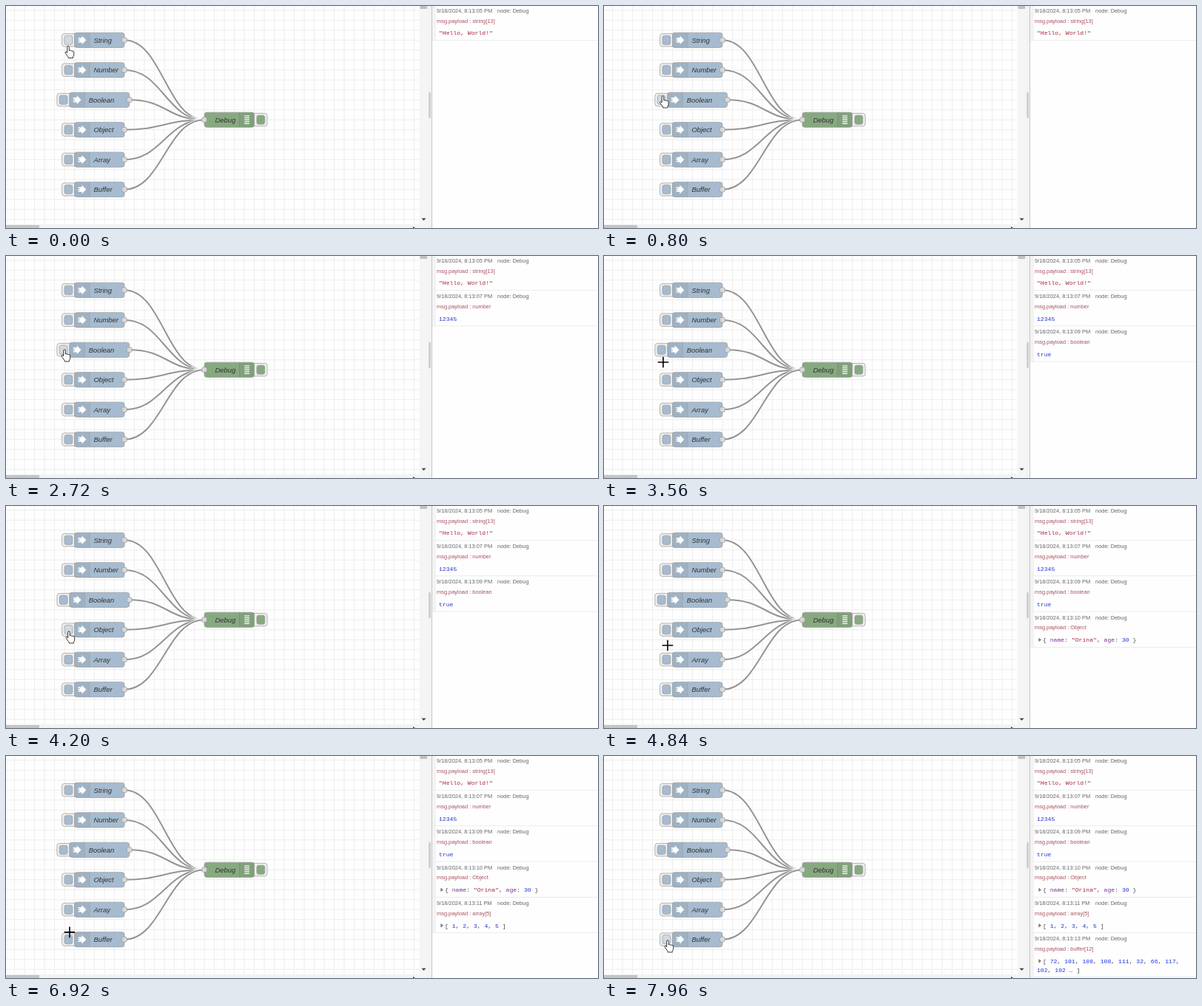
Recreate the animation shown at these times as an HTML page. Size 800 by 301 pixels, loop 8000 ms.

```html
<!DOCTYPE html>
<html lang="en">
<head>
<meta charset="utf-8">
<title>Flow editor with debug sidebar</title>
<style>
  html, body { margin: 0; width: 100%; height: 100%; overflow: hidden; background: #fefefe; }
  svg { display: block; width: 800px; height: 301px; }
  text { white-space: pre; }
  .label { font: italic 9.45px "Liberation Sans", Arial, sans-serif; fill: #333; }
  .meta { font: 7.43px "Liberation Sans", Arial, sans-serif; fill: #666; }
  .topic { fill: #a9525f; }
  .value { font: 8.1px "Liberation Mono", monospace; fill: #444; }
  .num { fill: #2033d6; }
  .str { fill: #a8243c; }
  .key { fill: #792e90; }
  .edge { stroke: #999; stroke-width: .7; }
</style>
</head>
<body>
<svg id="stage" viewBox="0 0 800 301"></svg>
<script>
const LOOP = 8000, UNIT = 0.675;
const BLUE = '#a6bbcf', GREEN = '#87a980';
const DEBUG = { x: 268, y: 154.25, w: 67.5 };

const injects = ['String', 'Number', 'Boolean', 'Object', 'Array', 'Buffer'].map((name, i) => {
  const w = (name === 'Boolean' ? 120 : 100) * UNIT;
  return { name, w, x: 126.25 - w / 2, y: 46.25 + i * 40.5 };
});

const num = s => `<tspan class="num">${s}</tspan>`;
const str = s => `<tspan class="str">${s}</tspan>`;
const key = s => `<tspan class="key">${s}</tspan>`;
const nums = list => list.map(num).join(', ');

const messages = [
  { at: 0, sec: '05', type: 'string[13]', lines: [str('"Hello, World!"')] },
  { at: 1440, sec: '07', type: 'number', lines: [num(12345)] },
  { at: 3240, sec: '09', type: 'boolean', lines: [num('true')] },
  { at: 4600, sec: '10', type: 'Object', folded: true,
    lines: [`{ ${key('name')}: ${str('"Orina"')}, ${key('age')}: ${num(30)} }`] },
  { at: 5960, sec: '11', type: 'array[5]', folded: true, lines: [`[ ${nums([1, 2, 3, 4, 5])} ]`] },
  { at: 7440, sec: '13', type: 'buffer[12]', folded: true,
    lines: [`[ ${nums([72, 101, 108, 108, 111, 32, 66, 117])},`, `${nums([102, 102])} … ]`] }
];

// Pointer hotspot: time, x, y
const pointerPath = [
  [0, 84, 54.5], [180, 84, 54.5], [740, 79.5, 122], [880, 79.5, 122],
  [1250, 82.5, 88], [1920, 82.5, 88], [2450, 79, 127], [3300, 79, 127],
  [3560, 80, 144], [4100, 85, 170], [4650, 85, 170], [4840, 86, 189],
  [5400, 87, 209], [6400, 87, 209], [6720, 86, 232], [7200, 86, 250], [LOOP, 86, 250]
];

const rect = (x, y, w, h, fill, extra = '') =>
  `<rect x="${x}" y="${y}" width="${w}" height="${h}" fill="${fill}" ${extra}/>`;
const box = (x, y, w, h, fill, r, extra = '') => rect(x, y, w, h, fill, `class="edge" rx="${r}" ${extra}`);
const text = (x, y, cls, content) => `<text x="${x}" y="${y}" class="${cls}">${content}</text>`;
const port = (x, y) => box(x - 3.4, y - 3.4, 6.75, 6.75, '#d9d9d9', 2);
const button = (x, innerX, y, fill, extra) =>
  box(x, y - 8.8, 21.6, 17.5, '#eee', 3.4) + box(innerX, y - 6.1, 10.8, 12.2, fill, 2.7, extra);

function iconPanel(x, y, lineX) {
  return rect(x, y - 9.8, 20.2, 19.6, '#000', 'opacity=".05"') +
    rect(lineX, y - 10, .7, 20, '#000', 'opacity=".12"');
}

function grid() {
  let d = '';
  for (let x = 11.5; x < 558; x += 13.5) d += `M${x} 0V296`;
  for (let y = 5.75; y < 296; y += 13.5) d += `M0 ${y}H558`;
  return `<path d="${d}" stroke="#eaeaea" stroke-width=".8"/>`;
}

function wire({ x, y, w }) {
  const from = x + w, reach = 75 * UNIT;
  const d = `M${from} ${y}C${from + reach} ${y} ${DEBUG.x - reach} ${DEBUG.y} ${DEBUG.x} ${DEBUG.y}`;
  return `<path d="${d}" fill="none" stroke="#fff" stroke-width="3.3"/>` +
    `<path d="${d}" fill="none" stroke="#949494" stroke-width="2"/>`;
}

function injectNode({ name, x, y, w }, i) {
  return button(x - 16.9, x - 13.5, y, BLUE, `id="button${i}"`) +
    box(x, y - 10.1, w, 20.25, BLUE, 3.4) + iconPanel(x, y, x + 20.2) +
    `<path transform="translate(${x + 10} ${y})" fill="#fff"
      d="M-5-3.3H0V-6L5.8 0 0 6V3.3H-5V1.8H-2.8V.8H-5V-.8H-2.8V-1.8H-5z"/>` +
    text(x + 25.9, y + 3.3, 'label', name) + port(x + w, y);
}

function debugNode({ x, y, w }) {
  let bars = '';
  for (let i = -2; i <= 2; i++) bars += rect(x + 54.2, y + i * 2.6 - .6, 6.8, 1.2, '#fff');
  return button(x + 63.5, x + 70.9, y, GREEN) + box(x, y - 10.1, w, 20.25, GREEN, 3.4) +
    iconPanel(x + 47.2, y, x + 47.2) + bars + text(x + 14.4, y + 3.3, 'label', 'Debug') + port(x, y);
}

function chrome() {
  return rect(558.5, 0, 11.5, 301, '#f5f5f5') + rect(559.5, 0, 9.5, 4, '#c1c1c1') +
    rect(0, 296, 558.5, 5, '#f3f3f3') + rect(0, 297, 45, 4, '#c5c5c5') +
    '<path d="M561.4 287.8h6.2l-3.1 3.2zM550 299l3 2h-3z" fill="#444"/>' +
    rect(570, 0, 6, 301, '#f3f3f3') + rect(575, 0, .8, 301, '#bbb') +
    rect(571.3, 117, 2.6, 35, '#cacaca', 'rx="1"') + rect(576, 0, 224, 301, '#fefefe');
}

function message({ sec, type, folded, lines }, i) {
  const top = i * 48.3, bottom = top + 46.5 + (lines.length - 1) * 11.5;
  return `<g id="message${i}">` +
    rect(576, top - 1.5, 5.2, bottom - top + 1.5, '#f3f3f3') + rect(576, bottom - .4, 224, .8, '#e8e8e8') +
    text(582, top + 8.7, 'meta', `9/18/2024, 8:13:${sec} PM`) + text(664, top + 8.7, 'meta', 'node: Debug') +
    text(582, top + 22.5, 'meta topic', `msg.payload : ${type}`) +
    (folded ? `<path d="M587.4 ${top + 33.8}l3.6 2.7-3.6 2.7z" fill="#777"/>` : '') +
    lines.map((line, n) => text(folded && !n ? 593 : 585, top + 39.4 + n * 11.6, 'value', line)).join('') + '</g>';
}

const pointers =
  `<path id="hand" fill="#fff" stroke="#222" stroke-width=".9" stroke-linejoin="round"
    d="M-1.3 9V1.2a1.3 1.3 0 0 1 2.6 0V6q1.2-.9 2.3.3 1.2-.8 2.2.4 1.9-.5 1.9 1.4V11q0 2-1.3 3.5V16H.2V14.8L-3.6 9.6q-1.1-1.6.5-2.2.9-.2 1.8 1.6z"/>
  <path id="cross" d="M-7.3 0H7.3M0-7.3V7.3" stroke="#000" stroke-width="1.6"/>`;

const byId = id => document.getElementById(id);
byId('stage').innerHTML = grid() + injects.map(wire).join('') + injects.map(injectNode).join('') +
  debugNode(DEBUG) + chrome() + messages.map(message).join('') + pointers;

function pointerAt(t) {
  const next = pointerPath.findIndex(p => p[0] > t);
  const [t0, x0, y0] = pointerPath[next - 1], [t1, x1, y1] = pointerPath[next];
  const u = (t - t0) / (t1 - t0), k = u * u * (3 - 2 * u);
  return [x0 + (x1 - x0) * k, y0 + (y1 - y0) * k];
}

function draw(t) {
  const [x, y] = pointerAt(t);
  const hovered = injects.findIndex(n => Math.abs(n.y - y) < 9);
  injects.forEach((_, i) => {
    const pressed = t >= messages[i].at - 180 && t < messages[i].at;
    byId('button' + i).setAttribute('fill-opacity', i !== hovered ? 1 : pressed ? .2 : .4);
    byId('message' + i).style.display = t >= messages[i].at ? '' : 'none';
  });
  for (const [id, shown] of [['hand', hovered >= 0], ['cross', hovered < 0]]) {
    byId(id).setAttribute('transform', `translate(${x} ${y})`);
    byId(id).style.display = shown ? '' : 'none';
  }
}

const start = performance.now();
function tick() {
  draw((performance.now() - start) % LOOP);
  requestAnimationFrame(tick);
}
tick();
</script>
</body>
</html>
```
